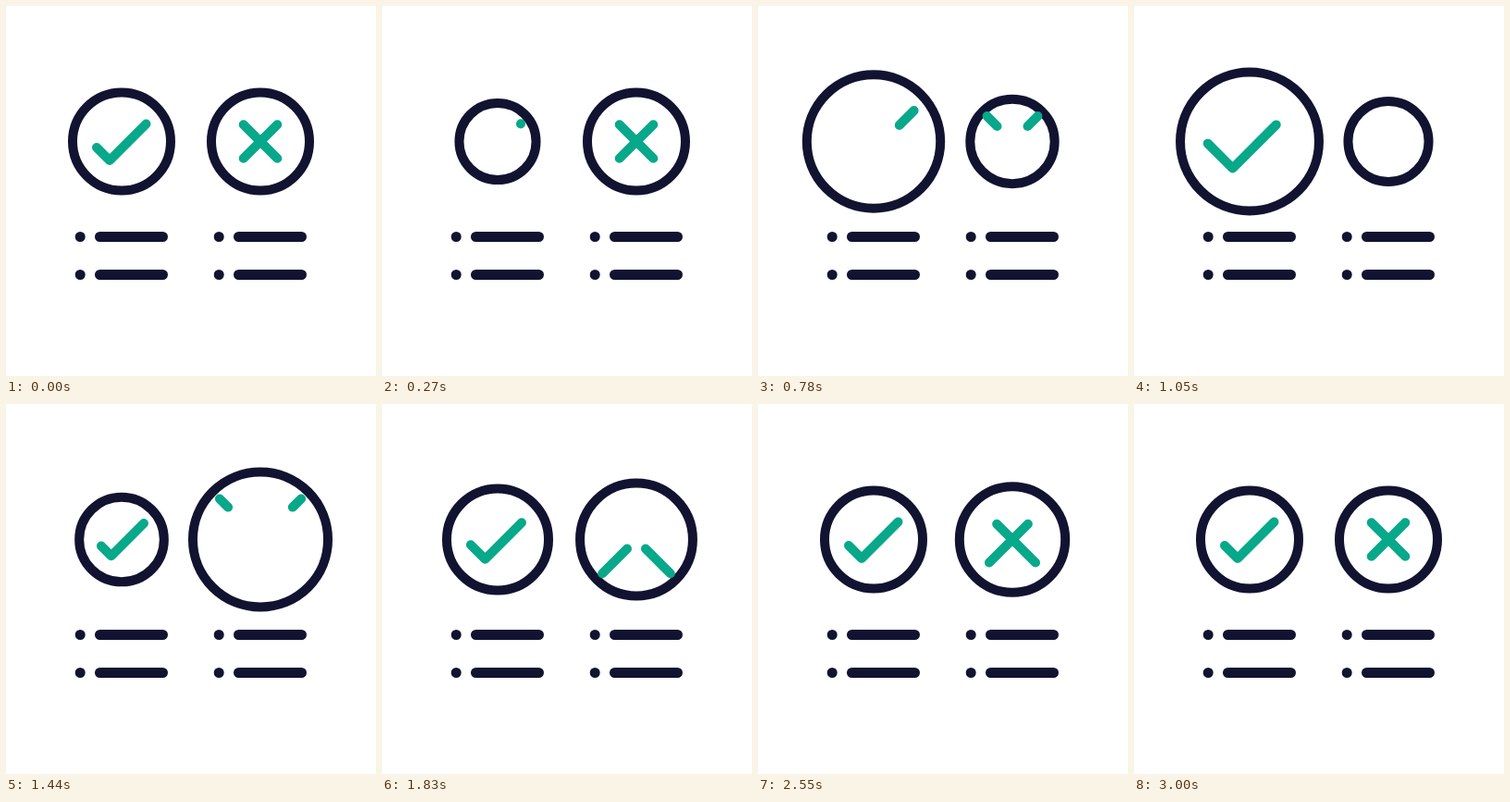
Recreate the animation shown at these times as an HTML page. Size 400x400 px, loop 5.09 s.

```html
<!DOCTYPE html>
<html lang="en">
<head>
<meta charset="utf-8">
<title>Check and cross</title>
<style>
  html, body { margin: 0; width: 100%; height: 100%; overflow: hidden; background: #fff; }
  svg { display: block; width: 100%; height: 100%; }
  path, circle { fill: none; stroke-width: 10; stroke-linecap: round; stroke-linejoin: round; }
  .ink { stroke: #121331; }
  .mark { stroke: #08a88a; }
  .bars { stroke-width: 11; }
</style>
</head>
<body>
<svg viewBox="0 0 400 400">
  <path class="ink bars" d="M80.2 249.5h.01M101.5 249.5h68M80.2 290.5h.01M101.5 290.5h68M230.2 249.5h.01M251.5 249.5h68M230.2 290.5h.01M251.5 290.5h68"/>
  <circle id="ringA" class="ink" cx="125" cy="146.5" r="53"/>
  <circle id="ringB" class="ink" cx="275" cy="146.5" r="53"/>
  <path id="check" class="mark"/>
  <path id="cross" class="mark"/>
</svg>
<script>
const LOOP = 5090, R = 53, CY = 146.5, AX = 125, BX = 275;
const $ = id => document.getElementById(id);
const clamp = (v, lo, hi) => Math.min(hi, Math.max(lo, v));

// Smooth curve through [time, value] keys, flat at every extreme.
function curve(...keys) {
  const slope = keys.map(([t, v], i) => {
    const p = keys[i - 1], n = keys[i + 1];
    if (!p || !n) return 0;
    const a = (v - p[1]) / (t - p[0]), b = (n[1] - v) / (n[0] - t);
    return a * b <= 0 ? 0 : 2 * a * b / (a + b);
  });
  return t => {
    if (t <= keys[0][0]) return keys[0][1];
    const i = keys.findIndex(k => k[0] > t);
    if (i < 0) return keys[keys.length - 1][1];
    const [t0, v0] = keys[i - 1], [t1, v1] = keys[i];
    const h = t1 - t0, u = (t - t0) / h, w = 1 - u;
    return v0 * (1 + 2 * u) * w * w + v1 * u * u * (3 - 2 * u)
      + h * u * w * (slope[i - 1] * w - slope[i] * u);
  };
}

// Radius added to each ring
const growA = curve([0, 0], [310, -12], [540, 7], [985, 24], [1050, 22], [1240, 8],
  [1425, -7.2], [1830, 2], [2000, 4], [2190, 1.7], [2430, 0]);
const growB = curve([540, 0], [960, -12], [1050, -9.5], [1440, 20], [1585, 21.5], [1830, 8],
  [2050, -7], [2540, 4.2], [2700, 3], [3000, 0]);

// Visible span of the check, measured from its corner
const checkFrom = curve([0, -14], [280, 45], [700, 45], [1000, -19.5], [1050, -19],
  [1440, -12.5], [1830, -15], [2250, -14]);
const checkTo = curve([0, 39.5], [200, 45], [780, 45], [1020, 33], [1050, 33.3],
  [1440, 40.7], [1830, 38], [2250, 39.5]);

// Visible span of each diagonal, measured from the centre
const crossFrom = curve([540, -18.3], [800, -32], [1470, -32], [1650, -8], [1830, 8.7],
  [2190, -23], [2550, -15.6], [3000, -18.3]);
const crossTo = curve([540, 18.3], [900, -32], [1400, -32], [1440, -25.5], [1650, 18],
  [1800, 36], [2190, 12], [2550, 23.2], [3000, 18.3]);

function checkPath(a, b, s) {
  const at = u => `${AX + (u - 13) * s} ${CY + (20.5 - Math.abs(u)) * s}`;
  if (b - a < 0.1) return "";
  return `M${at(a)}` + (a < 0 && b > 0 ? `L${at(0)}` : "") + `L${at(b)}`;
}

function crossPath(a, b, s) {
  a = clamp(a, -32, 32) * s;
  b = clamp(b, -32, 32) * s;
  if (b - a < 0.1) return "";
  return [1, -1].map(d => `M${BX + d * a} ${CY + a}L${BX + d * b} ${CY + b}`).join("");
}

function draw(t) {
  const ra = R + growA(t), rb = R + growB(t);
  $("ringA").setAttribute("r", ra);
  $("ringB").setAttribute("r", rb);
  $("check").setAttribute("d", checkPath(checkFrom(t), checkTo(t), ra / R));
  $("cross").setAttribute("d", crossPath(crossFrom(t), crossTo(t), rb / R));
}

const start = performance.now();
function tick() {
  draw((performance.now() - start) % LOOP);
  requestAnimationFrame(tick);
}
tick();
</script>
</body>
</html>
```
